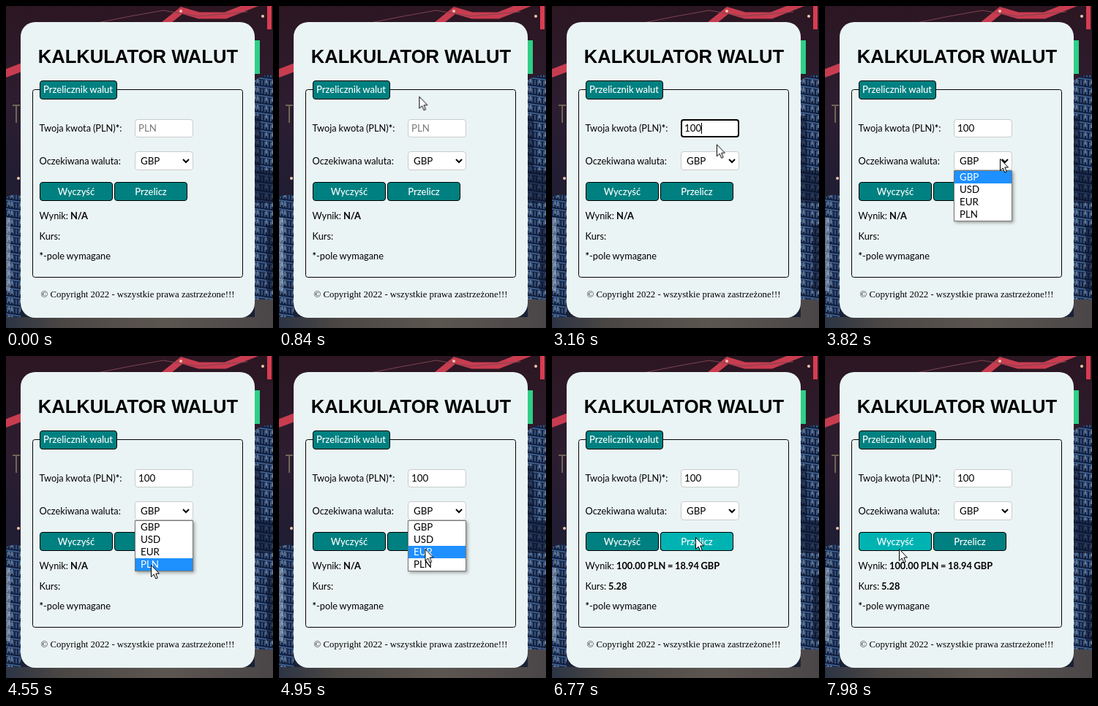
An HTML page for the animation above (8 s loop, 365x441 px).

```html
<!DOCTYPE html>
<html lang="pl">
<head>
<meta charset="utf-8">
<title>Kalkulator walut</title>
<style>
html, body { margin: 0; width: 100%; height: 100%; overflow: hidden; background: #1f1a28; }
svg { display: block; width: 365px; height: 441px; }
text { font: 12.8px Lato, sans-serif; fill: #000; white-space: pre; word-spacing: -.4px; }
.b { font-weight: 700; }
.ctl { font-size: 13.33px; }
.w { font-size: 13px; font-weight: 500; fill: #fff; }
.mid { text-anchor: middle; }
.title { font: 700 25.6px "Liberation Sans", Arial, sans-serif; word-spacing: 0; }
.foot { font: 12.8px "Liberation Serif", "Times New Roman", serif; word-spacing: 0; }
.btn { fill: #008080; stroke: #000; }
.hot { fill: #00b3b3; stroke: #000; }
.field { fill: #fff; stroke: #c8cccc; }
.focus { fill: none; stroke: #000; stroke-width: 2; }
[data-on] { animation: 8s step-end infinite; }

/* percent = ms / 80 */
#pointer { animation: move 8s infinite; }
@keyframes move {
  0%, 3.125% { transform: translate(274px, 403px); animation-timing-function: steps(6); }
  9.375% { transform: translate(184px, 104px); animation-timing-function: steps(3); }
  12.5%, 35.5% { transform: translate(206px, 163px); animation-timing-function: steps(7); }
  42.5% { transform: translate(239px, 209px); }
  47.75% { transform: translate(239px, 209px); animation-timing-function: steps(9); }
  56.875% { transform: translate(198px, 286px); animation-timing-function: steps(1); }
  57.875% { transform: translate(199px, 288px); animation-timing-function: steps(7); }
  65% { transform: translate(200px, 232px); }
  69.375% { transform: translate(200px, 232px); animation-timing-function: steps(5); }
  74.375% { transform: translate(196px, 248px); }
  84.625% { transform: translate(196px, 248px); animation-timing-function: steps(10); }
  94.625% { transform: translate(88px, 312px); animation-timing-function: steps(1); }
  95.625% { transform: translate(87px, 327px); }
  96.75% { transform: translate(87px, 327px); animation-timing-function: steps(3); }
  99.75%, 100% { transform: translate(101px, 264px); }
}
</style>
</head>
<body>
<svg viewBox="0 0 365 441">
  <defs>
    <linearGradient id="sky" x2="0" y2="1">
      <stop offset="0" stop-color="#2c1622"/>
      <stop offset=".3" stop-color="#2d1d30"/>
      <stop offset=".55" stop-color="#211d33"/>
      <stop offset="1" stop-color="#1a2236"/>
    </linearGradient>
    <linearGradient id="table">
      <stop offset="0" stop-color="#2c3444"/>
      <stop offset=".2" stop-color="#4a4644"/>
      <stop offset=".6" stop-color="#5c5650"/>
      <stop offset="1" stop-color="#4a4648"/>
    </linearGradient>
    <pattern id="coins" width="24" height="12" patternUnits="userSpaceOnUse" patternTransform="skewY(8)">
      <path fill="#101d3a" d="M0 0h24v12H0z"/>
      <path fill="#3b5c8c" d="M0 1h24v2H0z"/>
      <path stroke="#4a6c9c" stroke-width="1.5" d="M2 4v7M6 4v7M10 4v7M14 4v7M18 4v7M22 4v7"/>
      <path stroke="#b4c8dc" d="M4 3v5M8 3v6M20 3v5"/>
    </pattern>
    <filter id="shade" x="-20%" y="-20%" width="150%" height="150%">
      <feDropShadow dx="2" dy="2" stdDeviation="2" flood-opacity=".35"/>
    </filter>
  </defs>

  <!-- backdrop -->
  <path fill="url(#sky)" d="M0 0h365v441H0z"/>
  <path fill="none" stroke="#c83c50" stroke-width="11" d="M-2 93L24 83"/>
  <path fill="none" stroke="#c83c50" stroke-width="9" d="M214 27L240 6L264 13L300 13L348 -6"/>
  <path fill="none" stroke="#7c4450" d="M120 24L170 14L215 6L262 14L330 8"/>
  <g fill="#f6c8a8"><circle cx="239" cy="7" r="2"/><circle cx="351" cy="14" r="2"/><circle cx="17" cy="236" r="2"/></g>
  <path fill="#d83c50" d="M357 0h6v32h-6z"/>
  <path fill="#2fcf86" d="M340 47h7v46h-7z"/>
  <path fill="none" stroke="#6e6656" stroke-width="2" d="M9 136h10M14 136v24"/>
  <path fill="url(#coins)" d="M340 102q12-9 25-7v310h-25z"/>
  <path fill="#0a1228" opacity=".55" d="M340 150h8v110h-8zM340 225h25v45h-25zM356 300h9v90h-9z"/>
  <path fill="url(#coins)" d="M0 262q10-6 20-2v181H0z"/>
  <path fill="#c4d4e4" opacity=".4" d="M0 290h6v100H0z"/>
  <path fill="url(#table)" d="M0 426h340V402h25v39H0z"/>

  <!-- card -->
  <rect x="20" y="22" width="320" height="405" rx="20" fill="#ebf4f4"/>
  <text class="title mid" x="180.4" y="78">KALKULATOR WALUT</text>
  <rect x="36.5" y="114.5" width="287" height="257" rx="3" fill="none" stroke="#000"/>
  <rect class="btn" x="46.5" y="102.5" width="105" height="25" rx="3.5"/>
  <text class="w" x="51" y="119">Przelicznik walut</text>
  <text x="45.5" y="172">Twoja kwota (PLN)<tspan class="b">*</tspan>:</text>
  <text x="45.5" y="217">Oczekiwana waluta:</text>

  <!-- amount -->
  <rect class="field" x="176.5" y="155.5" width="79" height="24" rx="3.5"/>
  <rect class="focus" data-on="1170-3570" x="177" y="156" width="78" height="23" rx="3"/>
  <text class="ctl" data-on="0-2070" x="181" y="172" style="fill:#7d7876">PLN</text>
  <text class="ctl" data-on="2070-2580" x="181" y="172">1</text>
  <text class="ctl" data-on="2580-2750" x="181" y="172">10</text>
  <text class="ctl" data-on="2750-8000" x="181" y="172">100</text>
  <g stroke="#000">
    <path data-on="1170-1740" d="M181.5 160v15"/>
    <path data-on="2070-2580" d="M188.5 160v15"/>
    <path data-on="2580-2750" d="M196.5 160v15"/>
    <path data-on="2750-3250" d="M204.5 160v15"/>
  </g>
  <g data-on="1000-3080">
    <path fill="#f1f1f1" d="M239 161h13v14h-13z"/>
    <path fill="#505050" d="M242 166l3.5-4 3.5 4zM242 170l3.5 4 3.5-4z"/>
  </g>

  <!-- currency -->
  <rect class="field" x="176.5" y="199.5" width="79" height="25" rx="3.5"/>
  <rect class="focus" data-on="5550-6200" x="177" y="200" width="78" height="24" rx="3"/>
  <text class="ctl" x="184" y="217">GBP</text>
  <path fill="none" stroke="#000" stroke-width="2" d="M242 210l4 4 4-4"/>

  <!-- buttons -->
  <rect class="btn" x="46.5" y="241.5" width="99" height="25" rx="3.5"/>
  <rect class="hot" data-on="7980-8000" x="46.5" y="241.5" width="99" height="25" rx="3.5"/>
  <text class="w mid" x="96" y="259">Wyczyść</text>
  <rect class="btn" x="148.5" y="241.5" width="99" height="25" rx="3.5"/>
  <rect class="hot" data-on="5790-7010" x="148.5" y="241.5" width="99" height="25" rx="3.5"/>
  <text class="w mid" x="198" y="259">Przelicz</text>

  <!-- result -->
  <text data-on="0-6280" x="45.5" y="292">Wynik: <tspan class="b">N/A</tspan></text>
  <text data-on="6280-8000" x="45.5" y="292">Wynik: <tspan class="b">100.00 PLN = 18.94 GBP</tspan></text>
  <text x="45.5" y="320">Kurs: <tspan class="b" data-on="6280-8000">5.28</tspan></text>
  <text x="45.5" y="347"><tspan class="b">*</tspan>-pole wymagane</text>
  <text class="foot mid" x="180" y="399">© Copyright 2022 - wszystkie prawa zastrzeżone!!!</text>

  <!-- option list -->
  <g data-on="3570-5550">
    <rect x="176.5" y="225.5" width="79" height="69" fill="#fff" stroke="#767676" filter="url(#shade)"/>
    <g id="list"></g>
  </g>

  <g id="pointer">
    <circle data-on="1170-1340 3480-3570 5370-5550 6200-6360" r="12" fill="#ff0" opacity=".47"/>
    <path data-on="250-1000 3080-7170 7410-7490 7650-8000" fill="#fff" stroke="#000"
      d="M.5 .5V16.5L4.2 13L6.8 19L9.2 18L6.8 12H11.5Z"/>
    <path data-on="1000-3080 7170-7410 7490-7650" fill="none" stroke="#000"
      d="M-.5 -7.5h2l1 1 1-1h2M2.5 -7v15M-.5 8.5h2l1-1 1 1h2"/>
  </g>
</svg>
<script>
const options = [
  ["GBP", "3570-4144 5119-5550"],
  ["USD", "4144-4307 4956-5119"],
  ["EUR", "4307-4469 4793-4956"],
  ["PLN", "4469-4793"]
];
document.getElementById("list").innerHTML = options.map(([name, on], i) => {
  const y = 226 + 17 * i;
  const label = fill => `<text class="ctl" x="184" y="${y + 13}" style="fill:${fill}">${name}</text>`;
  return label("#000") + `<g data-on="${on}">
    <rect x="177" y="${y}" width="78" height="17" fill="#1e90ff"/>${label("#fff")}</g>`;
}).join("");

// Turn each "start-end" window (ms) into on/off keyframes.
let css = "";
document.querySelectorAll("[data-on]").forEach((el, i) => {
  const spans = el.dataset.on.split(" ").map(s => s.split("-").map(Number));
  const key = (ms, shown) => `${ms / 80}%{visibility:${shown ? "visible" : "hidden"}}`;
  let rule = spans[0][0] ? key(0, false) : "";
  for (const [from, to] of spans) {
    rule += key(from, true) + key(to, to === 8000);
  }
  css += `@keyframes on${i}{${rule}}`;
  el.style.animationName = "on" + i;
});
const sheet = document.createElement("style");
sheet.textContent = css;
document.head.append(sheet);
</script>
</body>
</html>
```
